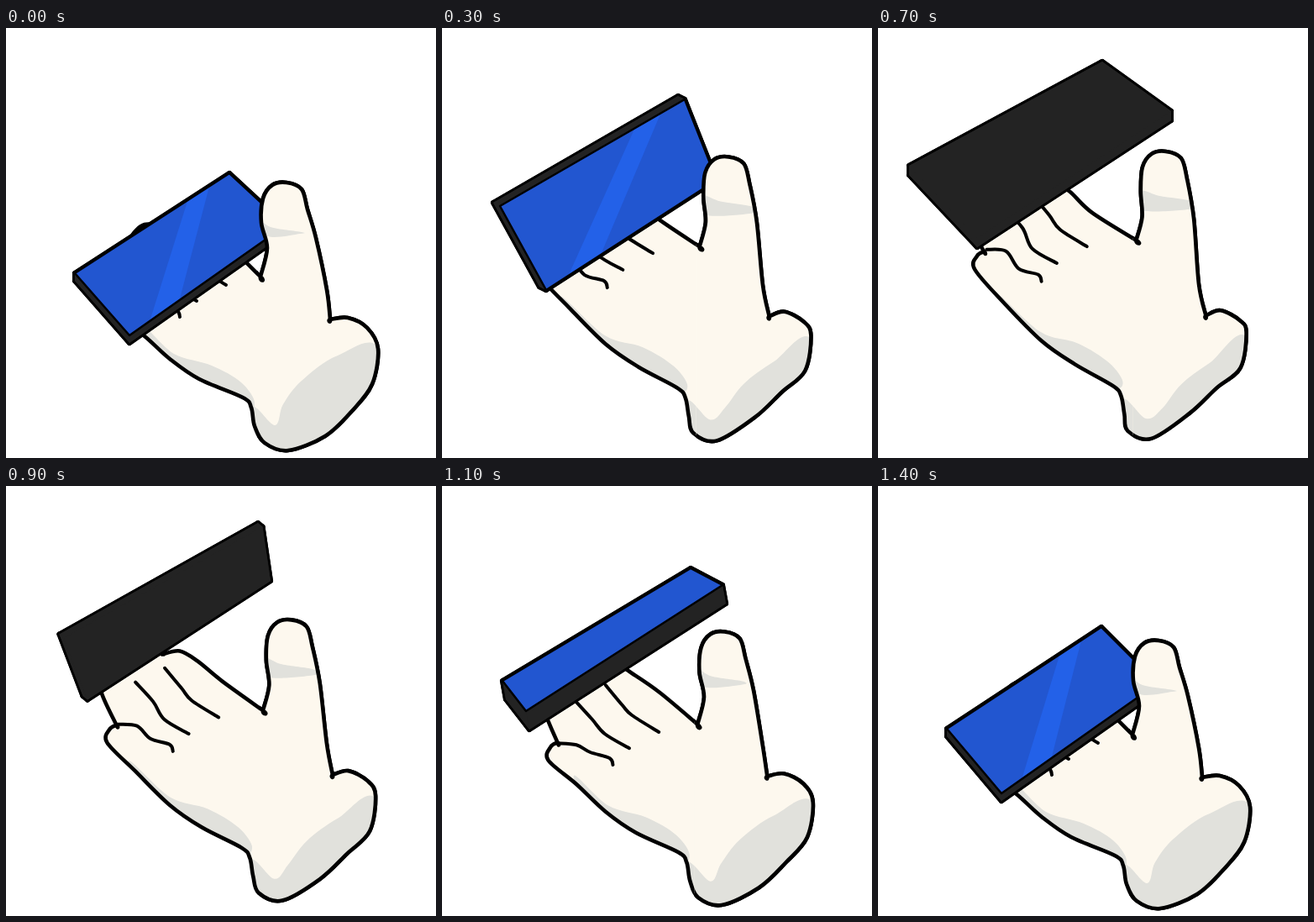
Animation, 512 px wide and 512 px high, one loop 1500 ms. Source, as an HTML page with a canvas:

```html
<!DOCTYPE html>
<html lang="en">
<head>
<meta charset="utf-8">
<title>Phone flip</title>
<style>
html, body { margin: 0; width: 100%; height: 100%; overflow: hidden; background: #fff; }
canvas { display: block; width: 512px; height: 512px; }
</style>
</head>
<body>
<canvas id="stage" width="512" height="512"></canvas>
<script>
const ctx = document.getElementById('stage').getContext('2d');
const STEP = 100, STEPS = 15;
const CREAM = '#fdf8ee', SHADE = '#e1e1dc', DARK = '#232323', BLUE = '#2256d0', SHINE = '#2361e8';

// Rows are [dx, dy, x, y, ...]: points of the closed hand and their shared shift when it opens
const thumb = [
  [4,-42, 311,262], [10,-42, 304,232, 306,203, 317,187, 334,184, 352,192, 359,216],
  [8,-26, 369,250], [0,-8, 382,312]
];
const wrist = [
  [5,-5, 386,347, 386,347], [1,-10, 407,345, 430,357], [-5,-22, 443,382, 436,424],
  [-10,-31, 412,456, 380,486], [-12,-16, 336,503, 308,494], [-3,-16, 296,474, 292,452, 282,440],
  [5,-20, 230,418], [0,-24, 195,394], [-19,-47, 165,367]
];
// Each finger ends in a corner; the last one is the web beside the thumb
const fingers = [
  [-18,-62, 131,342, 134,326, 142,321], [-22,-55, 126,276, 135,262, 152,256],
  [-2,-61, 150,247, 165,234, 188,236], [0,-47, 207,224, 228,236], [-8,-42, 262,257], [5,-49, 303,296]
].map((row, i) => i === 3 || i === 4 ? row : [...row, ...row.slice(-2)]);
const outline = [...thumb, ...wrist, ...fingers];

const creases = [
  [[-12,-67, 140,323, 163,325], [-14,-48, 180,329, 203,336, 207,344]],
  [[-10,-62, 160,270, 181,293], [-16,-51, 198,308, 227,325]],
  [[-17,-60, 199,252, 219,276], [-15,-52, 230,286, 262,306]]
];
const wristShade = [
  [-1,-9, 290,451, 320,473], [10,5, 330,448, 352,420], [0,10, 395,390], [-6,-15, 446,384],
  [0,0, 460,520, 280,520]
];
const palmShade = [
  [-33,-52, 165,358], [-8,-30, 200,388, 245,402], [-5,-26, 280,422, 296,446], [-10,-30, 280,454, 190,420]
];
const thumbShade = [
  [14,-36, 300,226], [23,-42, 315,237, 352,243], [30,-34, 350,245], [0,-35, 312,248]
];

// Phone poses: step, four corners of the facing side, depth vector
const poses = [
  [0, 82,292, 266,173, 333,235, 147,366, 0,9],
  [3, 69,212, 289,85, 327,181, 124,312, -8,-4],
  [5, 98,214, 333,74, 288,121, 80,246, -11,-14],
  [6, 48,196, 300,58, 345,84, 95,254, 0,6],
  [7, 37,164, 267,40, 349,99, 118,250, 0,11],
  [8, 40,142, 278,17, 342,98, 114,254, 0,5],
  [10, 98,220, 333,80, 288,128, 80,255, -11,-14],
  [11, 72,232, 296,98, 334,118, 100,268, 4,22],
  [12, 66,249, 265,128, 338,161, 128,300, 3,14]
];
const lastPose = [...poses[0]];
lastPose[0] = STEPS - 1;
lastPose[2] -= 3;
lastPose[4] -= 5;
poses.push(lastPose);

const mix = (a, b, k) => a.map((v, i) => v + (b[i] - v) * k);

function toPoints(flat) {
  const points = [];
  for (let i = 0; i < flat.length; i += 2) points.push([flat[i], flat[i + 1]]);
  return points;
}

const shape = (rows, open) => rows.flatMap(([dx, dy, ...flat]) =>
  toPoints(flat).map(([x, y]) => [x + dx * open, y + dy * open]));

// Catmull-Rom curve through the points; a repeated point makes a corner
function curve(p, closed) {
  const n = p.length, path = new Path2D();
  const at = i => closed ? p[(i + n) % n] : p[Math.max(0, Math.min(n - 1, i))];
  path.moveTo(...p[0]);
  for (let i = 0; i < (closed ? n : n - 1); i++) {
    const [a, b, c, d] = [at(i - 1), at(i), at(i + 1), at(i + 2)];
    path.bezierCurveTo(b[0] + (c[0] - a[0]) / 6, b[1] + (c[1] - a[1]) / 6,
                       c[0] - (d[0] - b[0]) / 6, c[1] - (d[1] - b[1]) / 6, c[0], c[1]);
  }
  return path;
}

function polygon(points) {
  const path = new Path2D();
  points.forEach(p => path.lineTo(...p));
  path.closePath();
  return path;
}

function fill(path, color) {
  ctx.fillStyle = color;
  ctx.fill(path);
}

function stroke(path, width) {
  ctx.lineWidth = width;
  ctx.stroke(path);
}

// 0 gripping, 1 open
function openness(step) {
  return step < 5 ? Math.sin(step / 5 * Math.PI / 2) ** 1.5
                  : Math.cos((step - 5) / 9 * Math.PI / 2) ** 2;
}

function drawHand(open) {
  const body = curve(shape(outline, open), true);
  fill(body, CREAM);
  ctx.save();
  ctx.clip(body);
  [wristShade, palmShade, thumbShade].forEach(s => fill(curve(shape(s, open), true), SHADE));
  ctx.restore();
  creases.forEach(c => stroke(curve(shape(c, open)), 4));
  stroke(body, 4.6);
}

function drawPhone(step) {
  const next = poses.find(p => p[0] >= step);
  const prev = poses.filter(p => p[0] <= step).pop();
  const pose = mix(prev, next, (step - prev[0]) / (next[0] - prev[0] || 1));
  const face = toPoints(pose.slice(1, 9)), [dx, dy] = pose.slice(9);
  const far = face.map(([x, y]) => [x + dx, y + dy]);
  const sides = face.map((p, i) => {
    const j = (i + 1) % 4;
    return polygon([p, face[j], far[j], far[i]]);
  });
  const front = polygon(face), parts = [polygon(far), ...sides, front];
  parts.forEach(p => stroke(p, 6));
  parts.forEach(p => fill(p, DARK));
  if (step > 5 && step < 11) return;

  fill(front, BLUE);
  const [tl, tr, br, bl] = face;
  if (bl[1] - tl[1] > 40) {
    fill(polygon([mix(tl, tr, .73), mix(tl, tr, .87), mix(bl, br, .32), mix(bl, br, .13)]), SHINE);
  }
  stroke(front, 2.5);
}

function draw() {
  const step = Math.floor(performance.now() / STEP) % STEPS;
  const open = openness(step);
  ctx.clearRect(0, 0, 512, 512);
  ctx.lineJoin = ctx.lineCap = 'round';
  ctx.strokeStyle = '#000';
  drawHand(open);
  drawPhone(step);
  // The thumb lies over the phone
  ctx.save();
  ctx.beginPath();
  ctx.rect(299 + 5 * open, 0, 300, 512);
  ctx.clip();
  drawHand(open);
  ctx.restore();
  requestAnimationFrame(draw);
}
draw();
</script>
</body>
</html>
```
